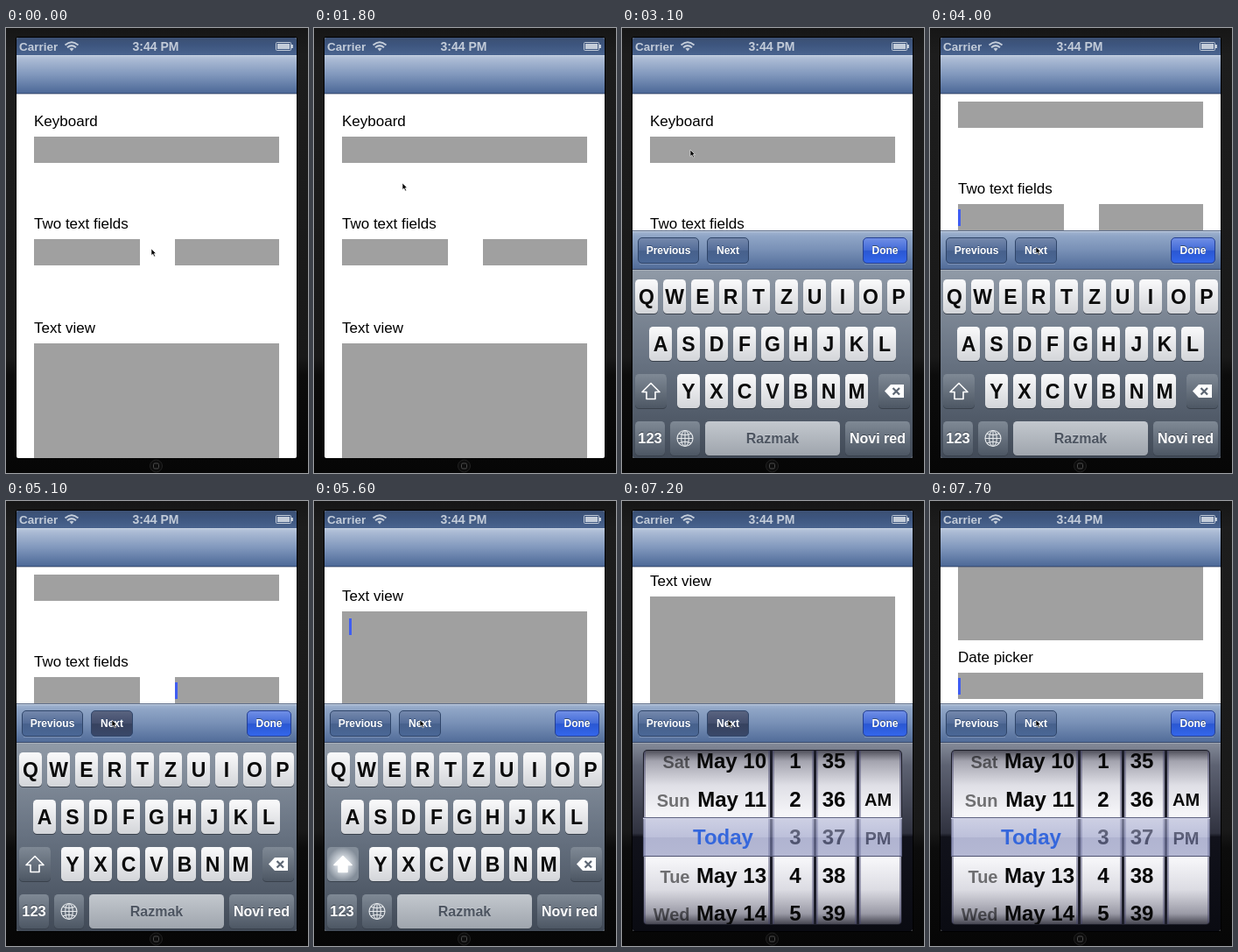
Recreate the animation shown at these times as an HTML page. Size 345 px wide and 508 px high, loop 8 s.

```html
<!DOCTYPE html>
<html lang="en">
<head>
<meta charset="utf-8">
<title>Keyboard toolbar demo</title>
<style>
html, body { margin: 0; width: 100%; height: 100%; overflow: hidden; background: #080808; }
svg { display: block; width: 345px; height: 508px; font-family: "Liberation Sans", Arial, sans-serif; }
.bold { font-weight: bold; }
</style>
</head>
<body>
<svg id="stage" viewBox="0 0 345 508" xmlns="http://www.w3.org/2000/svg"></svg>
<script>
const LOOP = 8000, STEP = 100;

const gradient = (id, ...stops) =>
  `<linearGradient id="${id}" x2="0" y2="1">${stops.map(([at, color]) =>
    `<stop offset="${at}" stop-color="${color}"/>`).join('')}</linearGradient>`;

const rect = (x, y, w, h, fill, extra = '') =>
  `<rect x="${x}" y="${y}" width="${w}" height="${h}" fill="${fill}" ${extra}/>`;

const text = (x, y, size, label, fill, extra = '') =>
  `<text x="${x}" y="${y}" font-size="${size}" fill="${fill}" ${extra}>${label}</text>`;

const centered = (x, y, size, label, fill, shadow) =>
  (shadow ? text(x, y - 1, size, label, shadow, 'class="bold" text-anchor="middle"') : '') +
  text(x, y, size, label, fill, 'class="bold" text-anchor="middle"');

const defs = `<defs>
  ${gradient('case', [0, '#161616'], [.06, '#1d1d1d'], [.74, '#191919'], [.78, '#0c0c0c'], [1, '#060606'])}
  ${gradient('status', [0, '#3c5072'], [.4, '#3d557e'], [1, '#4a648f'])}
  ${gradient('nav', [0, '#bac8dd'], [.12, '#a9b9d3'], [.5, '#8198bd'], [1, '#4b6796'])}
  ${gradient('bar', [0, '#a7b8d2'], [.15, '#8fa5c6'], [.5, '#7890b6'], [1, '#506b98'])}
  ${gradient('button', [0, '#7589ad'], [.5, '#536c98'], [.52, '#47618c'], [1, '#4a6796'])}
  ${gradient('pressed', [0, '#5a6480'], [.5, '#424d6c'], [.52, '#36425f'], [1, '#3a4869'])}
  ${gradient('done', [0, '#7290e6'], [.5, '#4069d8'], [.52, '#2a57d2'], [1, '#3467ec'])}
  ${gradient('board', [0, '#909aa7'], [.5, '#667180'], [1, '#414a57'])}
  ${gradient('key', [0, '#fafafb'], [1, '#d3d5d9'])}
  ${gradient('special', [0, '#7f8995'], [1, '#4d5764'])}
  ${gradient('space', [0, '#c3c8ce'], [1, '#9fa5ad'])}
  ${gradient('tray', [0, '#858b99'], [.12, '#5d6272'], [.48, '#30323f'], [.5, '#11121b'], [1, '#0a0b12'])}
  ${gradient('wheel', [0, '#50505b'], [.06, '#a3a3ae'], [.2, '#dfdfe6'], [.4, '#fafafc'],
    [.6, '#fafafc'], [.8, '#dcdce3'], [.94, '#9a9aa6'], [1, '#464651'])}
  ${gradient('lens', [0, '#b0b4d4'], [.5, '#949ac4'], [.52, '#7f85b4'], [1, '#868cb8'])}
  <radialGradient id="glow"><stop offset="0" stop-color="#f4f6f8"/><stop offset=".45" stop-color="#ccd2d9"/>
    <stop offset="1" stop-color="#848e9a"/></radialGradient>
  <clipPath id="screen"><rect x="12" y="11" width="320" height="480" rx="2"/></clipPath>
  <clipPath id="wheels"><rect x="25" y="285" width="294" height="198" rx="4"/></clipPath>
</defs>`;

const field = (x, y, w, h = 30) => rect(x, y, w, h, '#a0a0a0');
const label = (y, name) => text(32, y, 17, name, '#000');

const content = `<g id="content">
  ${label(112, 'Keyboard')}${field(32, 124, 280)}
  ${label(229, 'Two text fields')}${field(32, 241, 121)}${field(193, 241, 119)}
  ${label(348, 'Text view')}${field(32, 360, 280, 200)}
  ${label(585, 'Date picker')}${field(32, 597, 280)}
  <rect id="caret" width="3" height="19" fill="#3f5df2"/>
</g>`;

const statusColor = '#c3ccd9';
const header = rect(12, 11, 320, 20, 'url(#status)') +
  text(15, 26, 13.5, 'Carrier', statusColor, 'class="bold"') +
  centered(171, 26, 14, '3:44 PM', statusColor) +
  `<g fill="none" stroke="${statusColor}" stroke-width="2">
    <path d="M67.500 19.500Q75 13 82.500 19.500M70 22.300Q75 18 80 22.300"/>
    <path d="M72.500 23.500Q75 21.800 77.500 23.500L75 26.500Z" fill="${statusColor}" stroke="none"/>
    <rect x="308.500" y="16.500" width="17" height="9" rx="1" stroke-width="1"/></g>` +
  rect(310, 18, 14, 6, statusColor) + rect(326, 19, 2, 4, statusColor) +
  rect(12, 31, 320, 44, 'url(#nav)') + rect(12, 31, 320, 1, '#cad5e5') +
  rect(12, 74, 320, 1, '#3c527b') + rect(12, 75, 320, 1, '#24345a', 'opacity=".3"');

const button = (id, x, w, name, fill, edge = '#2f4569') =>
  rect(x + .5, 239.5, w - 1, 29, `url(#${fill})`, `id="${id}" rx="4.5" stroke="${edge}"`) +
  rect(x + 2, 269, w - 4, 1, '#93a6c5', 'opacity=".6"') +
  centered(x + w / 2, 258, 12, name, '#fff', '#344c73');

const toolbar = rect(12, 231, 320, 45, 'url(#bar)') +
  rect(12, 231, 320, 1, '#5d6d8a') + rect(12, 232, 320, 1, '#c0cddf') + rect(12, 275, 320, 1, '#39496a') +
  button('previous', 18, 70, 'Previous', 'button') +
  button('next', 97, 48, 'Next', 'button') +
  button('doneButton', 275, 51, 'Done', 'done', '#243f92');

const key = (x, y, w, fill, id = '') =>
  rect(x, y + 1, w, 39, '#39414c', 'rx="4.5"') +
  rect(x, y, w, 39, `url(#${fill})`, `rx="4.5" ${id && `id="${id}"`}`);

const keyRow = (letters, x, y) => [...letters].map((letter, i) =>
  key(x + i * 32, y, 26, 'key') + centered(x + i * 32 + 13, y + 28, 23, letter, '#0b0b0b')).join('');

const keyboard = `<g id="keyboard">
  ${rect(12, 276, 320, 215, 'url(#board)')}${rect(12, 276, 320, 1, '#a9b1bb')}
  ${keyRow('QWERTZUIOP', 15, 287)}${keyRow('ASDFGHJKL', 31, 341)}${keyRow('YXCVBNM', 63, 395)}
  ${key(15, 395, 36, 'special', 'shift')}${key(293, 395, 36, 'special')}
  ${key(15, 449, 34, 'special')}${key(55, 449, 34, 'special')}
  ${key(95, 449, 154, 'space')}${key(255, 449, 74, 'special')}
  <path id="arrow" d="M33 405.500L43 415.500H38V423.500H28V415.500H23Z" fill="none" stroke="#fff" stroke-width="1.600" stroke-linejoin="round"/>
  <path d="M300 414.500L307 407H322V422H307Z" fill="#fff"/>
  <path d="M309.500 411L317 418.500M317 411L309.500 418.500" stroke="#5c6673" stroke-width="2.200"/>
  <g fill="none" stroke="#e6e9ec" stroke-width="1.100"><circle cx="72" cy="468.500" r="9"/>
    <ellipse cx="72" cy="468.500" rx="4.300" ry="9"/><path d="M63 468.500H81M72 459.500V477.500M65 463Q72 466.500 79 463M65 474Q72 470.500 79 474"/></g>
  ${centered(32, 474, 16.5, '123', '#fff', '#3b434e')}
  ${centered(172, 474, 16, 'Razmak', '#4c5460', '#c6cad0')}
  ${centered(292, 474, 16, 'Novi red', '#fff', '#3b434e')}
</g>`;

const days = [['Sat', 'May 10'], ['Sun', 'May 11'], null, ['Tue', 'May 13'], ['Wed', 'May 14']];
const pickerRows = days.map((day, i) => {
  const y = 305 + i * 43.5;
  const date = day
    ? text(77.5, y, 20, day[0], '#000', 'class="bold" text-anchor="end" opacity=".52"') +
      text(165, y, 24, day[1], '#080808', 'class="bold" text-anchor="end"')
    : '';
  return date + centered(198, y, 24, i + 1, '#080808') + centered(242, y, 24, 35 + i, '#080808');
}).join('');

const wheel = ([x, w]) => rect(x, 285, w, 198, 'url(#wheel)') +
  [x, x + w - 2].map(edge => rect(edge, 285, 2, 198, '#3f3f66', 'opacity=".45"')).join('');

const picker = `<g id="picker">
  ${rect(12, 276, 320, 215, 'url(#tray)')}${rect(12, 276, 320, 1, '#a0a6b2')}
  ${rect(24, 284, 296, 200, '#1c1d28', 'rx="5"')}
  <g clip-path="url(#wheels)">
    ${[[25, 144], [172, 47], [222, 46], [271, 48]].map(wheel).join('')}
    ${pickerRows}
    ${centered(292.5, 348, 20, 'AM', '#080808')}${centered(292.5, 391.5, 20, 'PM', '#080808')}
  </g>
  ${rect(24, 362, 296, 43, 'url(#lens)', 'opacity=".6"')}
  ${rect(24, 361, 296, 1, '#5d6180')}${rect(24, 362, 296, 1, '#d4d7ea')}${rect(24, 405, 296, 1, '#4e5270')}
  ${text(81, 392, 24, 'Today', '#3567dc', 'class="bold"')}
</g>`;

const stage = document.getElementById('stage');
stage.innerHTML = defs + rect(0, 0, 345, 508, 'url(#case)') +
  rect(11, 10, 322, 482, '#000', 'rx="3"') +
  `<circle cx="171.500" cy="500" r="7" fill="#0d0d0d" stroke="#222"/>
   <rect x="168.500" y="497" width="6" height="6" rx="1.500" fill="none" stroke="#4a4a4a"/>
   <g clip-path="url(#screen)">${rect(12, 11, 320, 480, '#fff')}${content}${header}
   <g id="input">${toolbar}${keyboard}${picker}</g></g>
   <path id="pointer" d="M0 0V7.500L1.800 6L3.200 9L4.500 8.400L3.200 5.500H5.500Z" fill="#000" stroke="#fff" stroke-width=".6"/>`;

const el = Object.fromEntries([...stage.querySelectorAll('[id]')].map(node => [node.id, node]));

const ease = (t, start, length) => {
  const p = Math.min(1, Math.max(0, (t - start) / length));
  return p * p * (3 - 2 * p);
};

// Time, x, y of the pointer tip
const pointerPath = [[0, 166, 252], [1300, 166, 252], [1400, 154, 240], [1500, 154, 240], [1800, 101, 177],
  [2000, 85, 150], [2200, 78, 139], [3200, 78, 139], [3400, 108, 215], [3600, 121, 250], [LOOP, 121, 250]];

const pointerAt = t => {
  const i = pointerPath.findIndex(point => point[0] > t);
  const [t0, x0, y0] = pointerPath[i - 1], [t1, x1, y1] = pointerPath[i];
  const p = (t - t0) / (t1 - t0);
  return [x0 + (x1 - x0) * p, y0 + (y1 - y0) * p];
};

// From, until, x, y in page coordinates
const carets = [[2600, 3000, 32, 130], [3400, 3700, 32, 130], [3700, 4600, 32, 247], [4700, 5200, 193, 247],
  [5200, 6000, 40, 368], [6500, 7100, 40, 368], [7300, LOOP, 32, 603]];
const presses = [[3600, 3800], [4600, 4800], [5100, 5300], [7000, 7300]];
const within = t => ([from, until]) => t >= from && t < until;

const show = (node, visible) => node.setAttribute('visibility', visible ? 'visible' : 'hidden');
const move = (node, x, y) => node.setAttribute('transform', `translate(${x} ${y})`);

function render(t) {
  const scroll = 40 * ease(t, 3680, 300) + 194 * ease(t, 5180, 320) + 167 * ease(t, 7130, 350);
  move(el.content, 0, -Math.round(scroll));
  move(el.input, 0, 262 * (1 - ease(t, 2480, 380)));
  move(el.pointer, ...pointerAt(t));

  const caret = carets.find(within(t));
  show(el.caret, caret);
  if (caret) {
    el.caret.setAttribute('x', caret[2]);
    el.caret.setAttribute('y', caret[3]);
  }

  const picking = t >= 7100, shifted = t >= 5200;
  show(el.keyboard, !picking);
  show(el.picker, picking);
  el.shift.setAttribute('fill', `url(#${shifted ? 'glow' : 'special'})`);
  el.arrow.setAttribute('fill', shifted ? '#fff' : 'none');
  el.next.setAttribute('fill', `url(#${presses.some(within(t)) ? 'pressed' : 'button'})`);
}

const began = performance.now();
function tick() {
  const t = (performance.now() - began) % LOOP;
  render(Math.floor(t / STEP) * STEP);
  requestAnimationFrame(tick);
}
tick();
</script>
</body>
</html>
```
